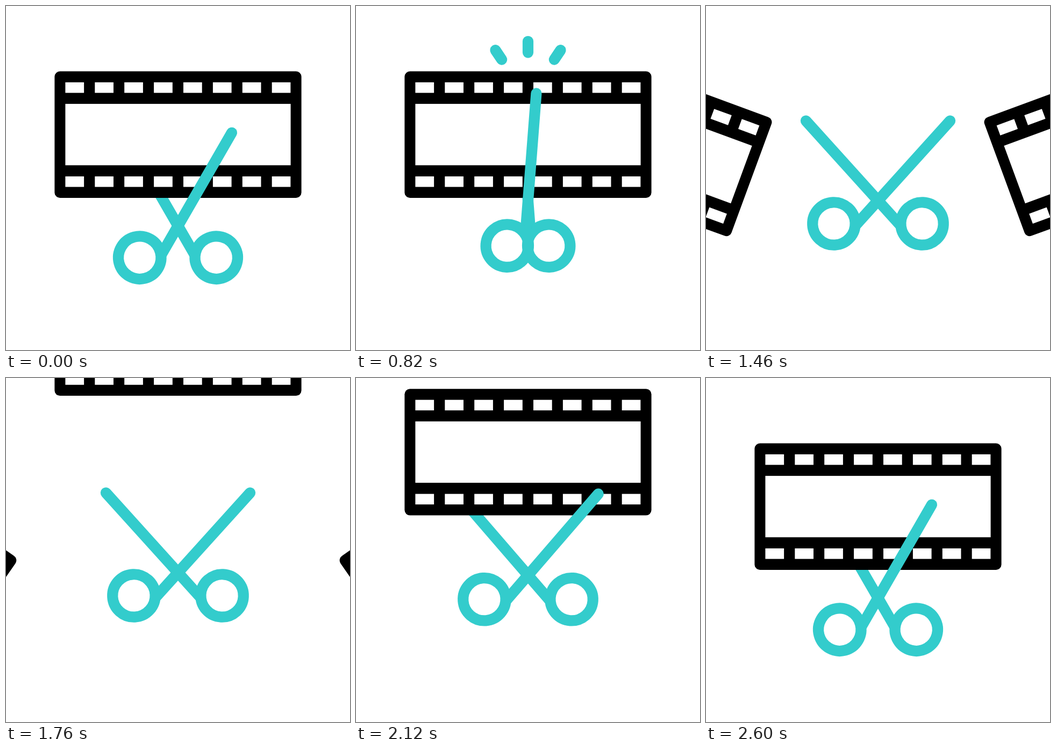
Write an HTML page with a canvas that moves like this. It is 640 px wide and 640 px high and loops after 3 s.

```html
<!DOCTYPE html>
<html lang="en">
<head>
<meta charset="utf-8">
<title>Film cutting</title>
<style>
  html, body { margin: 0; overflow: hidden; background: #fff; }
  canvas { display: block; }
</style>
</head>
<body>
<canvas id="stage" width="640" height="640"></canvas>
<script>
const ctx = document.getElementById('stage').getContext('2d');
const TEAL = '#33cccc', LOOP = 3000, DEG = Math.PI / 180;
const CLOSED = 0, READY = 30, OPEN = 42.1;

// Eased progress from 0 to 1 between two times
function ease(t, from, to) {
  const s = Math.min(1, Math.max(0, (t - from) / (to - from)));
  return s * s * (3 - 2 * s);
}
const mix = (a, b, p) => a + (b - a) * p;

function line(x1, y1, x2, y2) {
  ctx.beginPath();
  ctx.moveTo(x1, y1);
  ctx.lineTo(x2, y2);
  ctx.stroke();
}

// Strip of film centred on the origin
function film(holes) {
  const w = 20 + 54.9 * holes, left = -w / 2;
  ctx.fillStyle = '#000';
  ctx.beginPath();
  ctx.roundRect(left, -117.7, w, 235.4, 10);
  ctx.fill();
  ctx.fillStyle = '#fff';
  ctx.fillRect(left + 20, -57.2, w - 40, 114.2);
  for (let i = 0; i < holes; i++) {
    const x = left + 20 + 54.9 * i;
    ctx.fillRect(x, -97.3, 34.7, 19.6);
    ctx.fillRect(x, 77.7, 34.7, 19.6);
  }
}

function wholeFilm(dy) {
  ctx.save();
  ctx.translate(320, 239.3 + dy);
  film(8);
  ctx.restore();
}

// Half of the cut strip flying off; side is 1 for left, -1 for right
function halfFilm(side, p) {
  const dx = p * (537 - p * (121 + 38 * p));
  const dy = p * (-87.5 + p * (408 - 165 * p));
  ctx.save();
  ctx.translate(320, 239.3);
  ctx.scale(side, 1);
  ctx.translate(-109.8 - dx, dy);
  ctx.rotate(39.5 * p * DEG);
  film(4);
  ctx.restore();
}

function blade(side, y, angle) {
  ctx.save();
  ctx.translate(320, y);
  ctx.scale(side, 1);
  ctx.rotate(angle * DEG);
  line(0, -200, 0, 62);
  ctx.beginPath();
  ctx.arc(-32.1, 86.9, 39.7, 0, 2 * Math.PI);
  ctx.stroke();
  ctx.restore();
}

function sparks(t) {
  const head = mix(66, 146, ease(t, 600, 1040));
  const tail = mix(66, 146, ease(t, 680, 1120));
  if (head - tail < 0.1) return;
  for (const side of [-1, 0, 1]) {
    ctx.save();
    ctx.translate(320, 172);
    ctx.rotate(34 * side * DEG);
    const extra = 2 * Math.abs(side);
    line(0, -head - extra, 0, -tail - extra);
    ctx.restore();
  }
}

function scissorAngle(t) {
  if (t < 440) return mix(READY, OPEN, ease(t, 200, 440));
  if (t < 660) return mix(OPEN, CLOSED, ease(t, 440, 660));
  if (t < 2000) return mix(CLOSED, OPEN, ease(t, 660, 1460));
  return mix(OPEN, READY, ease(t, 2000, 2600));
}

function draw(t) {
  const angle = scissorAngle(t);
  const y = mix(409, 362, ease(t, 200, 440) - ease(t, 2000, 2600));
  ctx.fillStyle = '#fff';
  ctx.fillRect(0, 0, 640, 640);
  ctx.strokeStyle = TEAL;
  ctx.lineWidth = 20.2;
  ctx.lineCap = 'round';

  blade(-1, y, angle);
  sparks(t);
  if (t <= 905) {
    wholeFilm(0);
  } else {
    const p = ease(t, 905, 2000);
    halfFilm(1, p);
    halfFilm(-1, p);
    wholeFilm(mix(-362, 0, ease(t, 1600, 2400)));
  }
  blade(1, y, angle);
}

function tick() {
  draw(performance.now() % LOOP);
  requestAnimationFrame(tick);
}
tick();
</script>
</body>
</html>
```
